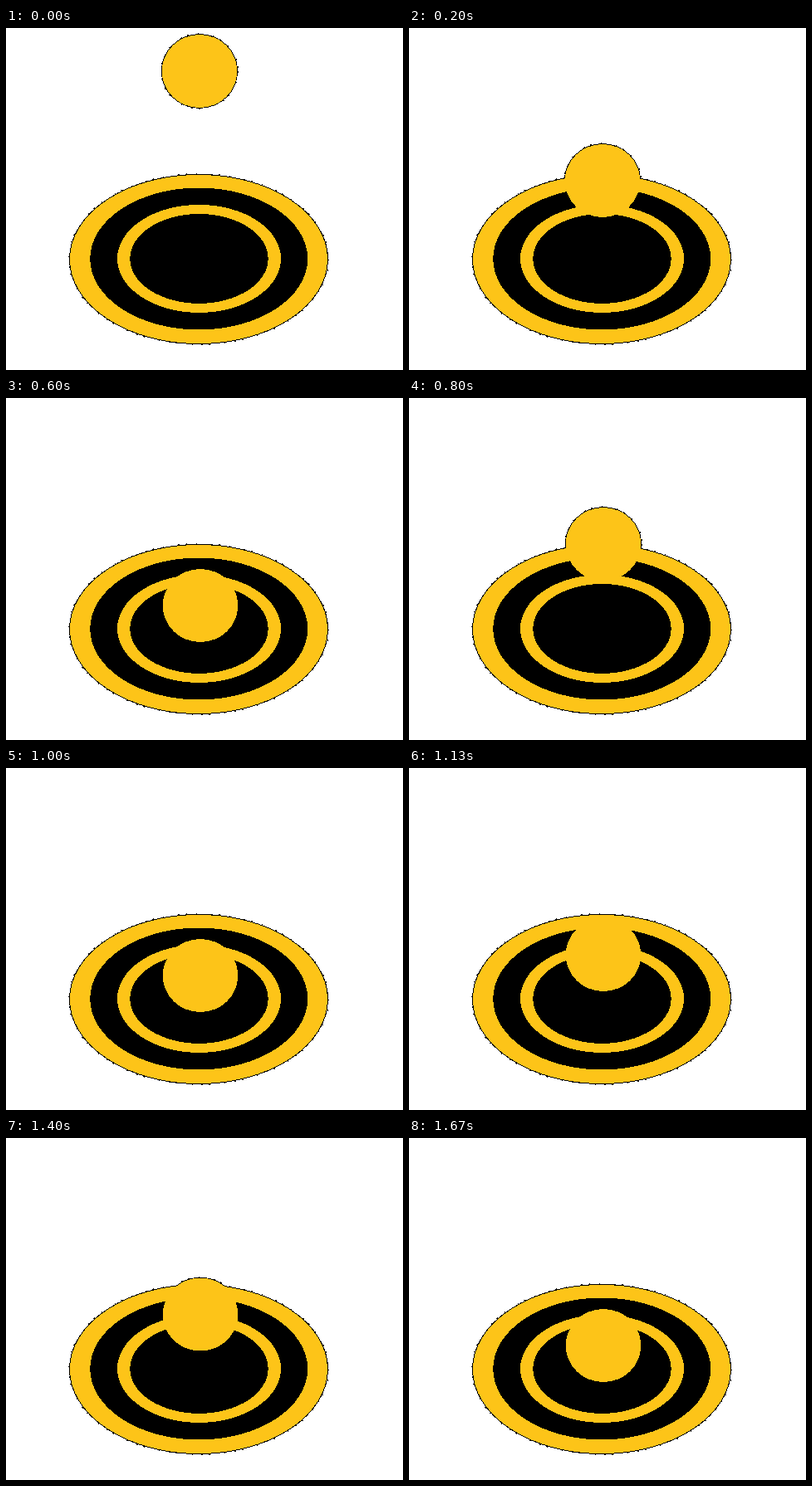
Recreate the animation shown at these times as an HTML page. Size 478x412 px, loop 2.39 s.

```html
<!DOCTYPE html>
<html lang="en">
<head>
<meta charset="utf-8">
<title>Bouncing ball</title>
<style>
  html, body { margin: 0; width: 100%; height: 100%; overflow: hidden; background: #fff; }
  svg { display: block; width: 478px; height: 412px; shape-rendering: crispEdges; }
  .gold { fill: #fdc418; }
  .outline { fill: none; stroke: #000; stroke-width: 1; }
  .specks { fill: none; stroke: #000; stroke-width: 1.5; stroke-dasharray: 2 11 1 17 2 7; }
</style>
</head>
<body>
<svg viewBox="0 0 478 412">
  <g class="ball">
    <ellipse class="outline" rx="45.5" ry="44.2"/>
    <ellipse class="specks" rx="46.3" ry="45"/>
  </g>
  <ellipse class="specks" cx="232" cy="278.5" rx="156.2" ry="102.7"/>
  <ellipse class="gold" cx="232" cy="278.5" rx="155.5" ry="102"/>
  <ellipse class="outline" cx="232" cy="278.5" rx="155.5" ry="102"/>
  <ellipse cx="232.2" cy="278" rx="131" ry="85.5"/>
  <ellipse class="gold" cx="232.5" cy="277.9" rx="98.5" ry="65"/>
  <ellipse cx="232.5" cy="277.9" rx="83.2" ry="54"/>
  <g class="ball"><ellipse class="gold" rx="45.2" ry="44"/></g>
</svg>
<script>
const LOOP = 2390;
const FLOOR = 250;
// [step, height] keys, joined by straight moves
const KEYS = [[0, 52], [3, FLOOR], [5, 176.5], [6, 176.5], [7, FLOOR],
              [10, 176], [12, FLOOR], [16, 200], [20, FLOOR]];
const balls = document.querySelectorAll('.ball');

function heightAt(step) {
  const next = KEYS.findIndex(([s]) => s > step);
  if (next < 0) return FLOOR;
  const [s0, y0] = KEYS[next - 1], [s1, y1] = KEYS[next];
  return y0 + (y1 - y0) * (step - s0) / (s1 - s0);
}

function draw(now) {
  // Poses advance at 12.5 per second, shown on a 15 per second grid.
  const tick = Math.floor((now % LOOP) * 0.015 + 0.06);
  const step = Math.floor(tick * 5 / 6 + 0.25);
  const x = step < 6 ? 233 : 234;
  for (const ball of balls) ball.setAttribute('transform', `translate(${x} ${heightAt(step)})`);
}

const start = performance.now();
function frame() {
  draw(performance.now() - start);
  requestAnimationFrame(frame);
}
frame();
</script>
</body>
</html>
```
